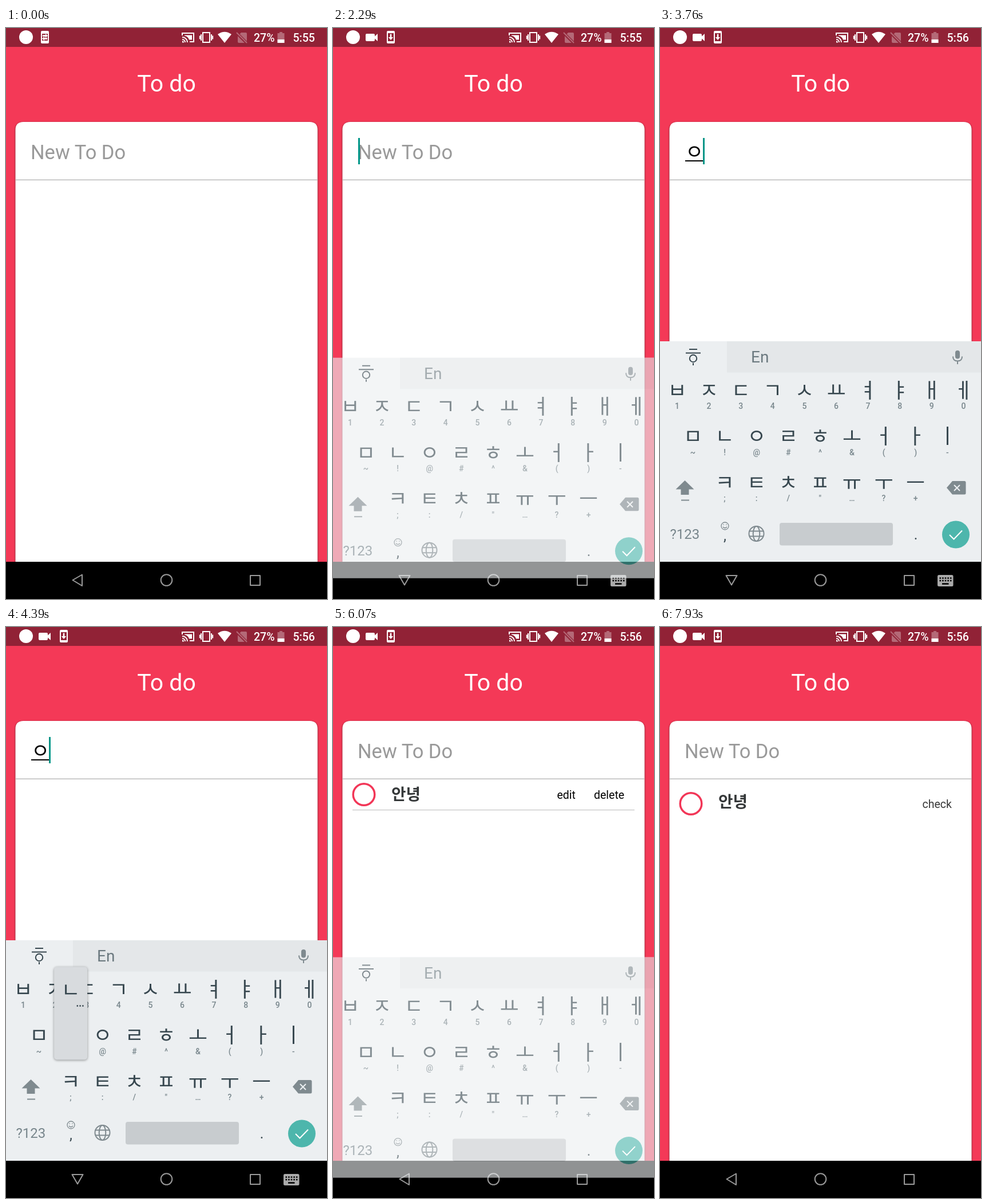
Animation of 561 by 997 pixels, one loop 8000 ms. Source, as an HTML page:

```html
<!DOCTYPE html>
<html lang="ko">
<head>
<meta charset="utf-8">
<title>To do</title>
<style>
html, body { margin: 0; width: 100%; height: 100%; overflow: hidden; background: #f43957; }
svg { display: block; width: 100%; height: 100%; font-family: Roboto, sans-serif; }
.ko { font-family: "Noto Sans CJK KR", "Noto Sans CJK", "Noto Sans CJK JP", sans-serif; }
.mid { text-anchor: middle; }
.line { fill: none; stroke-width: 2; }
.card { filter: drop-shadow(0 1px 1.5px rgba(0, 0, 0, .6)); }
.key { font-size: 36px; fill: #37474f; }
.hint { font-size: 14px; font-weight: 500; fill: #78868c; }
#popup rect { fill: #d8dbde; filter: drop-shadow(0 1px 2px rgba(0, 0, 0, .4)); }
</style>
</head>
<body>
<svg viewBox="0 0 561 997" xml:space="preserve">
  <rect width="561" height="997" fill="#f43957"/>
  <rect width="561" height="33" fill="#912236"/>

  <!-- status bar -->
  <g fill="#fff">
    <circle cx="35" cy="16" r="12"/>
    <g id="swapIcon">
      <rect x="61" y="5" width="14" height="22" rx="2"/>
      <path d="M63 10h10v12h-10z" fill="#912236"/>
      <path d="M64 12h5v-2l4 3.500-4 3.500v-2h-5zM72 20h-5v2l-4-3.500 4-3.500v2h5z"/>
    </g>
    <g id="recordIcons">
      <path d="M59 10h12q2 0 2 2v2.500l5-4.500v13l-5-4.500v2.500q0 2-2 2h-12q-2 0-2-2v-9q0-2 2-2z"/>
      <rect x="94" y="5" width="14" height="22" rx="2"/>
      <path d="M96 9h10v14h-10z" fill="#912236"/>
      <path d="M99.800 10.500h2.500v5.500h3l-4.300 5-4.300-5h3z"/>
    </g>
    <g class="line" stroke="#fff">
      <path d="M308 13v-4h20v15h-7M308 16a9 9 0 0 1 9 9M308 20a5 5 0 0 1 5 5"/>
      <path d="M344 8h12v17h-12zM341 11v11M338.800 13.500v6M359 11v11M361.200 13.500v6"/>
    </g>
    <path d="M308 22.500a3 3 0 0 1 3 3h-3zM312 12.500h13v8h-5q-2-6-8-7z"/>
    <path d="M370 11q12-8.500 24 0l-12 15z"/>
    <g opacity=".32">
      <path d="M411 8h8q2 0 2 2v13l-12.500-12.500zM405 14l12 12h-10q-2 0-2-2z"/>
      <path d="M403 8l18 18" class="line" stroke="#fff"/>
      <path d="M478 7h5v2h3.500v17h-12v-17h3.500z"/>
    </g>
    <path d="M474.500 20h12v6h-12z"/>
    <g font-size="19.500" font-weight="500">
      <text x="433" y="24">27%</text>
      <text x="501.500" y="24" id="clock"></text>
    </g>
  </g>

  <text class="mid" x="280.500" y="111" font-size="41" fill="#fff">To do</text>
  <path class="card" d="M16.500 932V178q0-14 14-14h500q14 0 14 14V932z" fill="#fff"/>
  <path d="M17 265.200h527" stroke="#bcbcbc" stroke-width="1.500"/>

  <!-- input -->
  <text id="hintText" x="43" y="229" font-size="34.500" fill="#999">New To Do</text>
  <text id="typed" class="ko" x="44" y="229" font-size="35"></text>
  <rect id="underline" x="44" y="231" height="2"/>
  <rect id="cursor" y="192" width="3" height="46" fill="#009688"/>

  <!-- list item -->
  <g id="item">
    <circle id="ring" cx="54" r="18.800" fill="none" stroke="#f23657" stroke-width="3.500"/>
    <text id="label" class="ko" x="102" font-size="27.700" font-weight="700" fill="#353839">안녕</text>
    <g id="actions" font-size="19.500">
      <text id="edit" x="391.500" y="300">edit</text>
      <text x="456" y="300">delete</text>
      <path d="M34 319.500h493" stroke="#bbb" stroke-width="1.200"/>
    </g>
    <text id="check" x="458.500" y="316" font-size="19.500">check</text>
  </g>

  <!-- navigation bar -->
  <rect y="932" width="561" height="65"/>
  <g class="line" stroke="#9a9a9a" stroke-linejoin="round">
    <path id="back" d="M116.500 964l16.500-9.500v19.500z"/>
    <path id="down" d="M115.500 956h19l-9.500 16.500z"/>
    <circle cx="280.500" cy="964" r="9.800"/>
    <path d="M427 956h17v17h-17z"/>
  </g>
  <g id="imeIcon">
    <rect x="485" y="955" width="27.500" height="20" rx="2.500" fill="#aaa"/>
    <path d="M488.500 960.500h21M488.500 965h21" stroke="#000" stroke-width="2.600" stroke-dasharray="2.600 2"/>
    <path d="M493 970.500h11.500" stroke="#000" stroke-width="2.600"/>
  </g>

  <!-- keyboard -->
  <g id="board">
    <rect y="547" width="561" height="385" fill="#eceff1"/>
    <rect x="117" y="547" width="444" height="54.500" fill="#e4e7e9"/>
    <g class="line" stroke="#37474f">
      <path d="M51 561h14M45 567.500h26M58 585v4"/>
      <circle cx="58" cy="577" r="6.200"/>
    </g>
    <text x="159" y="584" font-size="28" fill="#6c7a80">En</text>
    <g fill="#7f8a8f">
      <rect x="516" y="563" width="8" height="14.500" rx="4"/>
      <path d="M512 573.500q0 8 8 8t8-8M520 581.500v5.500" class="line" stroke="#7f8a8f"/>
      <path d="M43.500 790l16 15.500h-9v9.500h-14v-9.500h-9zM37 823.500h14v2h-14z"/>
      <path d="M511 791h21q2.500 0 2.500 2.500v18.500q0 2.500-2.500 2.500h-21l-10-11.800z"/>
      <path d="M514 798l10 10m0-10l-10 10" class="line" stroke="#eceff1" stroke-width="2.500"/>
    </g>
    <g id="keys"></g>
    <text x="17.500" y="892" font-size="24" fill="#78868c">?123</text>
    <g class="line" stroke="#7f8a8f">
      <circle cx="113.500" cy="869.500" r="6.500" stroke-width="1.300"/>
      <path d="M110 871q3.500 4 7 0M111 866.500v1.500M116 866.500v1.500" stroke-width="1.300"/>
      <circle cx="168.500" cy="883" r="13"/>
      <ellipse cx="168.500" cy="883" rx="5.800" ry="13"/>
      <path d="M157 878.500h23M157 887.500h23"/>
    </g>
    <g class="mid" font-size="25" fill="#37474f">
      <text x="113.500" y="895">,</text>
      <text x="447" y="893">.</text>
    </g>
    <rect x="209" y="864" width="198" height="39.500" rx="4" fill="#c8cccf"/>
    <circle id="enter" cx="517" cy="884.500" r="24"/>
    <path d="M506 885l7.500 7.500 14.500-15" class="line" stroke="#fff" stroke-width="2.800"/>
    <g id="popup">
      <rect x="-29" y="-119" width="58" height="162" rx="5"/>
      <text id="popupKey" class="ko key mid" y="-66"></text>
      <path d="M10.500-51h12" stroke="#37474f" stroke-width="2.400" stroke-dasharray="2.400 2.400"/>
    </g>
  </g>
</svg>
<script>
const LOOP = 8000;
const $ = id => document.getElementById(id);
const show = (id, on) => $(id).setAttribute('display', on ? 'inline' : 'none');
const set = (id, name, value) => $(id).setAttribute(name, value);
const ramp = (t, from, to) => Math.min(1, Math.max(0, (t - from) / (to - from)));
const within = (t, [from, to]) => t >= from && t < to;

const rows = [
  { x: 30, y: 632, keys: 'ㅂㅈㄷㄱㅅㅛㅕㅑㅐㅔ', hints: '1234567890' },
  { x: 57.5, y: 712.5, keys: 'ㅁㄴㅇㄹㅎㅗㅓㅏㅣ', hints: '~!@#^&()-' },
  { x: 113, y: 793, keys: 'ㅋㅌㅊㅍㅠㅜㅡ', hints: ';:/"…?+' }
];
const blinks = [[350, 850], [1340, 1750], [2160, 5680]];
const typing = [[3760, 'ㅇ'], [4520, '아'], [4590, '안'], [4730, '안ㄴ'], [4900, '안녀'], [5110, '안녕'], [5890, '']];
const presses = [
  [3640, 3760, 'ㅇ'], [4180, 4320, 'ㅏ'], [4390, 4520, 'ㄴ'],
  [4660, 4730, 'ㄴ'], [4820, 4900, 'ㅕ'], [5040, 5170, 'ㅇ']
];
const keyAt = {};

function addText(cls, x, y, str) {
  const el = document.createElementNS($('keys').namespaceURI, 'text');
  el.setAttribute('class', cls);
  el.setAttribute('x', x);
  el.setAttribute('y', y);
  el.textContent = str;
  $('keys').append(el);
}

for (const { x, y, keys, hints } of rows) {
  [...keys].forEach((key, i) => {
    const cx = x + i * 55.6;
    keyAt[key] = [cx, y];
    addText('ko key mid', cx, y + 13.5, key);
    addText('hint mid', cx, y + 33, hints[i]);
  });
}

function drawInput(t) {
  const step = typing.filter(([at]) => t >= at).pop();
  const text = step ? step[1] : '';
  const width = text.length * 32;
  $('typed').textContent = text;
  show('hintText', !text);
  set('underline', 'width', width);
  set('cursor', 'x', 44 + width - (width ? 1 : 0));
  show('cursor', blinks.some(span => within(t, span)));
}

function drawKeyboard(t) {
  const rise = 1 - (1 - ramp(t, 2160, 2500)) ** 2;
  const open = t < 5000 ? rise : 1 - ramp(t, 5950, 6200) ** 1.3;
  show('board', open > 0);
  set('board', 'opacity', open);
  set('board', 'transform', `translate(0 ${76 * (1 - open)})`);
  set('enter', 'fill', within(t, [5680, 5890]) ? '#45a49b' : '#4db6ac');

  const press = presses.find(span => within(t, span));
  show('popup', press);
  if (press) {
    $('popupKey').textContent = press[2];
    set('popup', 'transform', `translate(${keyAt[press[2]]})`);
  }
}

function drawItem(t) {
  const editing = t >= 7860;
  show('item', t >= 5890);
  set('ring', 'cy', editing ? 308.5 : 292.5);
  set('label', 'y', editing ? 315 : 302);
  show('actions', !editing);
  show('check', editing);
  set('edit', 'opacity', 1 - 0.8 * ramp(t, 7660, 7810));
  set('check', 'opacity', 0.2 + 0.8 * ramp(t, 7830, 7970));
}

function draw(t) {
  const ime = within(t, [1750, 5950]);
  show('swapIcon', t < 200);
  show('recordIcons', t >= 200);
  show('back', !ime);
  show('down', ime);
  show('imeIcon', ime);
  $('clock').textContent = t < 3230 ? '5:55' : '5:56';
  drawInput(t);
  drawItem(t);
  drawKeyboard(t);
}

const start = performance.now();
function tick() {
  draw((performance.now() - start) % LOOP);
  requestAnimationFrame(tick);
}
tick();
</script>
</body>
</html>
```
